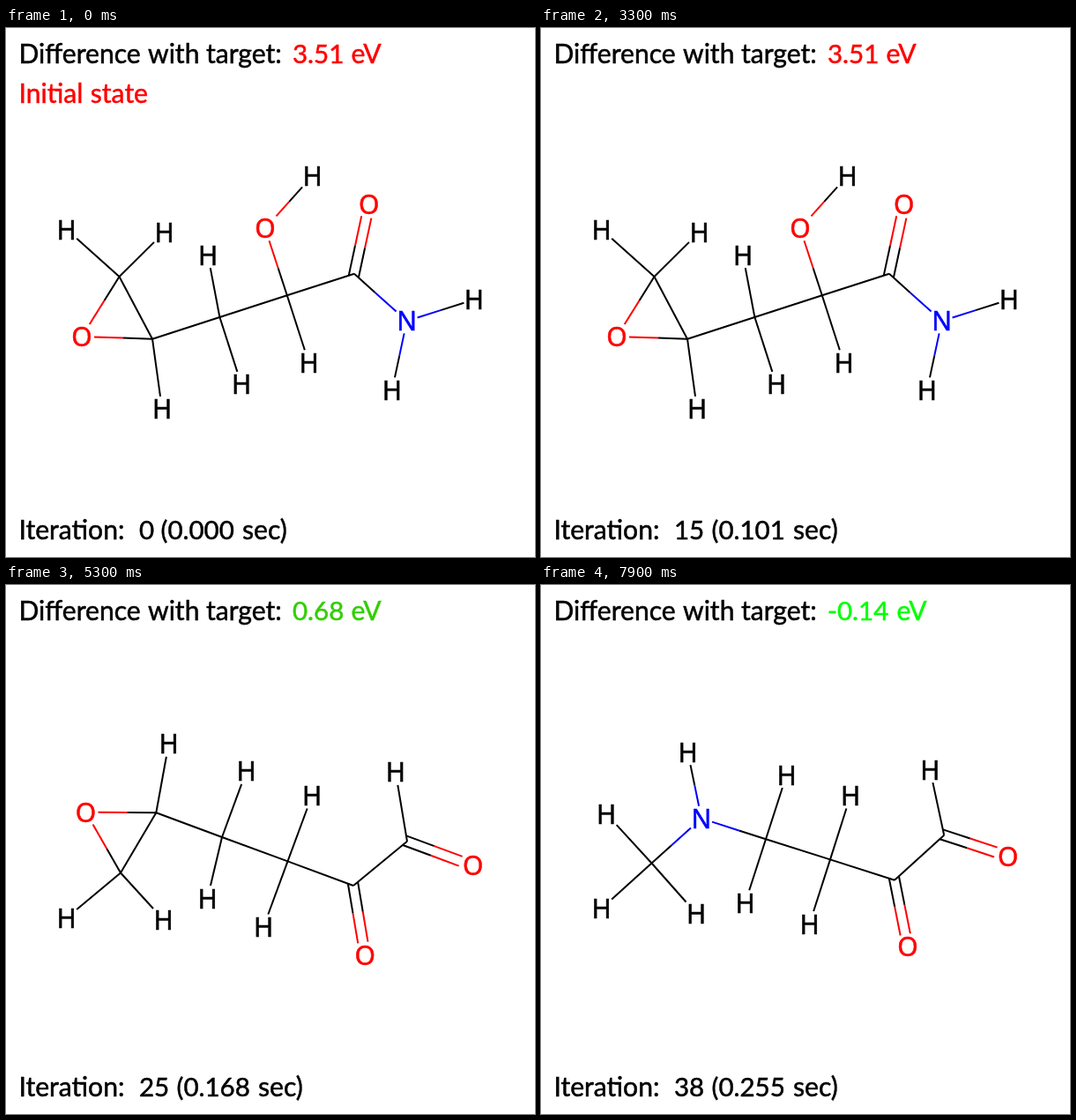
An HTML page with a canvas for the animation above (8 s loop, 600x600 px).

```html
<!DOCTYPE html>
<html lang="en">
<head>
<meta charset="utf-8">
<title>Molecule search</title>
<style>
html, body { margin: 0; width: 100%; height: 100%; overflow: hidden; background: #fff; }
canvas { display: block; width: 600px; height: 600px; }
</style>
</head>
<body>
<canvas id="stage" width="600" height="600"></canvas>
<script>
const ctx = document.getElementById('stage').getContext('2d');
const LOOP = 8000;
const WORD_SIZE = 30.1, NUMBER_SIZE = 29.5;
const COLORS = { C: '#000', H: '#000', O: '#f00', N: '#00f' };
// Half width and height of the gap kept free around each label
const GAPS = { C: [0, 0], H: [11.5, 14.5], O: [14, 14], N: [12, 14] };

const atom = el => (x, y, ...links) => ({ el, x, y, links });
const C = atom('C'), H = atom('H'), O = atom('O'), N = atom('N');
const double = node => ({ ...node, double: true });

function amide() {
  const ringO = O(86, 350);
  const ring = C(166, 352.7, ringO, H(177, 432.4),
    C(128.5, 282, ringO, H(68.7, 228.5), H(179.5, 231.5)));
  const tail = C(395, 278.7, double(O(411.8, 200.4)),
    N(454.6, 332.4, H(530.9, 308), H(437.9, 410.9)));
  const mid = C(318.8, 303.3, O(293.9, 227.3, H(347.6, 167.6)), H(343.5, 379.8), tail);
  return C(242.4, 328, H(229, 257.6), H(267, 404.4), ring, mid);
}

function epoxide() {
  const ringO = O(90.5, 257.6);
  const ring = C(170.3, 258.3, ringO, H(184.5, 180.3),
    C(130, 326.5, ringO, H(68.7, 377.5), H(178.5, 379.6)));
  const tail = C(394, 341, double(O(407.2, 419.5)),
    C(455, 290.8, H(441.9, 212.3), double(O(529.6, 318.4))));
  const mid = C(319.5, 313.4, H(347, 239), H(292, 388), tail);
  return C(245, 286, H(272.5, 211.4), H(228.5, 355.6), ring, mid);
}

function amine() {
  const head = N(182, 264.7, H(166.5, 189.6),
    C(125.5, 315.5, H(74.2, 259.6), H(68.7, 366.8), H(176, 372.5)));
  const tail = C(401, 334.8, double(O(416, 410.4)),
    C(457.2, 283.8, H(441.3, 209.6), double(O(529.8, 307.6))));
  const mid = C(328, 311.4, H(351, 239), H(304.5, 384.5), tail);
  return C(255, 288.3, H(278.5, 215.5), H(231.5, 360.7), head, mid);
}

const STATES = [
  { from: 0, mol: amide(), diff: '3.51', unitX: 391.5, color: '#f00' },
  { from: 22, mol: epoxide(), diff: '0.68', unitX: 391.5, color: 'rgb(49,206,0)' },
  { from: 28, mol: amine(), diff: '-0.14', unitX: 403.5, color: '#0f0' }
];

function line(x1, y1, x2, y2, color) {
  ctx.lineWidth = 2;
  ctx.strokeStyle = color;
  ctx.beginPath();
  ctx.moveTo(x1, y1);
  ctx.lineTo(x2, y2);
  ctx.stroke();
}

// Slightly emboldened text
function print(text, x, y, color) {
  ctx.fillStyle = ctx.strokeStyle = color;
  ctx.lineWidth = 0.5;
  ctx.fillText(text, x, y);
  ctx.strokeText(text, x, y);
}

function trim(el, dx, dy) {
  const [w, h] = GAPS[el];
  return Math.min(w / (Math.abs(dx) || 1e-6), h / (Math.abs(dy) || 1e-6));
}

function bond(a, b) {
  const dx = b.x - a.x, dy = b.y - a.y, len = Math.hypot(dx, dy);
  const back = b.double ? 3.2 / len : 0;
  const start = trim(a.el, dx, dy) - back;
  const end = 1 - trim(b.el, dx, dy);
  const half = (start + end) / 2;
  for (const off of b.double ? [-5.7, 5.7] : [0]) {
    const ox = -dy / len * off, oy = dx / len * off;
    const at = k => [a.x + dx * k + ox, a.y + dy * k + oy];
    if (COLORS[a.el] === COLORS[b.el]) {
      line(...at(start), ...at(end), COLORS[a.el]);
    } else {
      line(...at(start), ...at(half), COLORS[a.el]);
      line(...at(half), ...at(end), COLORS[b.el]);
    }
  }
}

function molecule(node, seen = new Set()) {
  if (seen.has(node)) return;
  seen.add(node);
  if (node.el !== 'C') print(node.el, node.x, node.y + 11, COLORS[node.el]);
  for (const next of node.links) {
    bond(node, next);
    molecule(next, seen);
  }
}

function word(text, x, y, color = '#000') {
  const size = /\d/.test(text) ? NUMBER_SIZE : WORD_SIZE;
  ctx.font = size + 'px Lato, sans-serif';
  print(text, x, y, color);
  // Join "ti" with a bar at x-height
  const i = text.indexOf('ti');
  if (i >= 0) {
    const end = x + ctx.measureText(text.slice(0, i + 1)).width;
    ctx.fillRect(end - 2, y - size * 0.506, 5, 2.4);
  }
}

function draw(t) {
  const step = Math.max(0, Math.floor((t - 300) / 200));
  const state = STATES.filter(s => s.from <= step).pop();
  ctx.fillStyle = '#fff';
  ctx.fillRect(0, 0, 600, 600);

  ctx.textAlign = 'center';
  ctx.font = '30px "Noto Sans", sans-serif';
  molecule(state.mol);

  ctx.textAlign = 'left';
  word('Difference', 14.5, 39.6);
  word('with', 161, 39.6);
  word('target:', 227, 39.6);
  word(state.diff, 325, 39.6, state.color);
  word('eV', state.unitX, 39.6, state.color);
  if (step === 0) {
    word('Initial', 14.5, 84.6, '#f00');
    word('state', 95.8, 84.6, '#f00');
  }
  const shift = step > 9 ? 18 : 0;
  word('Iteration:', 14.5, 579.6);
  word(String(step), 151, 579.6);
  word('(' + (step * 0.00671).toFixed(3), 175.5 + shift, 579.6);
  word('sec)', 268 + shift, 579.6);
}

const begin = performance.now();
function tick() {
  draw((performance.now() - begin) % LOOP);
  requestAnimationFrame(tick);
}
tick();
</script>
</body>
</html>
```
